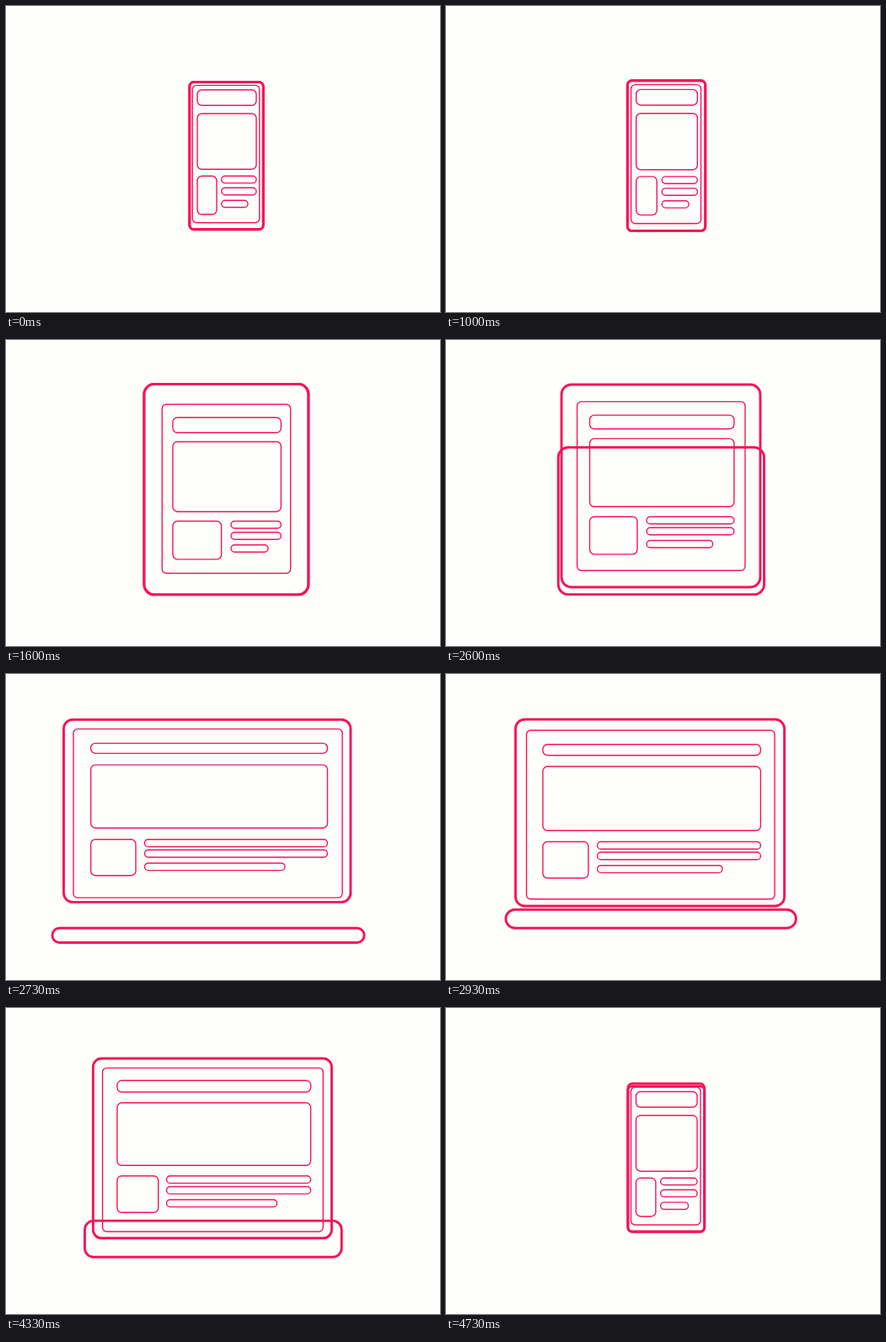
An HTML page for the animation above (4.8 s loop, 515x364 px).

```html
<!DOCTYPE html>
<html lang="en">
<head>
<meta charset="utf-8">
<title>Responsive devices</title>
<style>
  html, body { margin: 0; width: 100%; height: 100%; overflow: hidden; background: #fefefd; }
  svg { display: block; width: 515px; height: 364px; }
  rect { fill: none; stroke: #f4145c; stroke-width: 1.4; }
  .thick { stroke-width: 2.9; }
</style>
</head>
<body>
<svg id="stage" viewBox="0 0 515 364"></svg>
<script>
  // Each box: left, top, right, bottom, corner radius
  const phone = {
    body:   [217.8, 90.5, 305.3, 265.7, 5],
    base:   [217.8, 90.5, 305.3, 265.7, 5],
    screen: [221.2, 94.4, 300.8, 257.8, 5],
    header: [227, 99.7, 297, 118.3, 5.5],
    hero:   [227, 128, 297, 194.3, 5.5],
    thumb:  [227, 202.3, 250, 248, 5.5],
    line1:  [255.7, 202.3, 297, 210.6, 5],
    line2:  [255.7, 216.3, 297, 224.7, 5],
    line3:  [255.7, 231.2, 287, 239.5, 5]
  };
  const tablet = {
    body:   [164, 52.5, 358.8, 302.8, 12],
    base:   [164, 52.5, 358.8, 302.8, 12],
    screen: [185.3, 76.5, 337.6, 277.5, 5],
    header: [198, 92.2, 326.3, 110.3, 5.5],
    hero:   [198, 121, 326.3, 204.2, 5.5],
    thumb:  [198, 215.5, 255.6, 260.8, 5.5],
    line1:  [267, 215.5, 326.3, 224, 5],
    line2:  [267, 228.7, 326.3, 237.2, 5],
    line3:  [267, 243.7, 311, 252.2, 5]
  };
  const laptop = {
    body:   [80.7, 54, 402.5, 275.4, 11],
    base:   [68.9, 285.3, 416.6, 302.3, 11.5],
    screen: [93.5, 66.8, 391.2, 267.6, 5],
    header: [113.1, 83.6, 374.4, 96.4, 5.5],
    hero:   [113.1, 109.8, 374.4, 185.9, 5.5],
    thumb:  [113.1, 199.2, 167, 242.4, 5.5],
    line1:  [177.6, 199.2, 374.4, 207.9, 5],
    line2:  [177.6, 211.7, 374.4, 220.4, 5],
    line3:  [177.6, 227.4, 328.4, 236, 5]
  };

  const moves = [
    { at: 983.5, from: phone, to: tablet },
    { at: 2550, from: tablet, to: laptop },
    { at: 4300, from: laptop, to: phone }
  ];
  const LOOP = 4800, FPS = 15, LAST = LOOP * FPS / 1000 - 1;
  const OMEGA = 19.5, ZETA = 0.52;

  // Step response of an underdamped spring, t in ms
  function spring(t) {
    if (t <= 0) return 0;
    const s = t / 1000, root = Math.sqrt(1 - ZETA * ZETA), a = OMEGA * root * s;
    return 1 - Math.exp(-ZETA * OMEGA * s) * (Math.cos(a) + ZETA / root * Math.sin(a));
  }

  const stage = document.getElementById('stage');
  const rects = {};
  for (const name in phone) {
    const el = document.createElementNS('http://www.w3.org/2000/svg', 'rect');
    if (name === 'body' || name === 'base') el.setAttribute('class', 'thick');
    rects[name] = stage.appendChild(el);
  }

  function place(el, [x0, y0, x1, y1, r]) {
    // The base turns over when the spring overshoots
    const w = Math.abs(x1 - x0), h = Math.abs(y1 - y0);
    const attrs = {
      x: Math.min(x0, x1), y: Math.min(y0, y1), width: w, height: h,
      rx: Math.max(0, Math.min(r, w / 2, h / 2))
    };
    for (const key in attrs) el.setAttribute(key, attrs[key].toFixed(2));
  }

  function draw(ms) {
    const step = Math.min(LAST, Math.floor((ms + 6.7) * FPS / 1000));
    const t = step * 1000 / FPS;
    const move = moves.filter(m => m.at <= t).pop() || moves[0];
    const p = spring(t - move.at);
    for (const name in rects) {
      const to = move.to[name];
      place(rects[name], move.from[name].map((v, i) => v + (to[i] - v) * p));
    }
  }

  const start = performance.now();
  function tick() {
    draw((performance.now() - start) % LOOP);
    requestAnimationFrame(tick);
  }
  tick();
</script>
</body>
</html>
```
